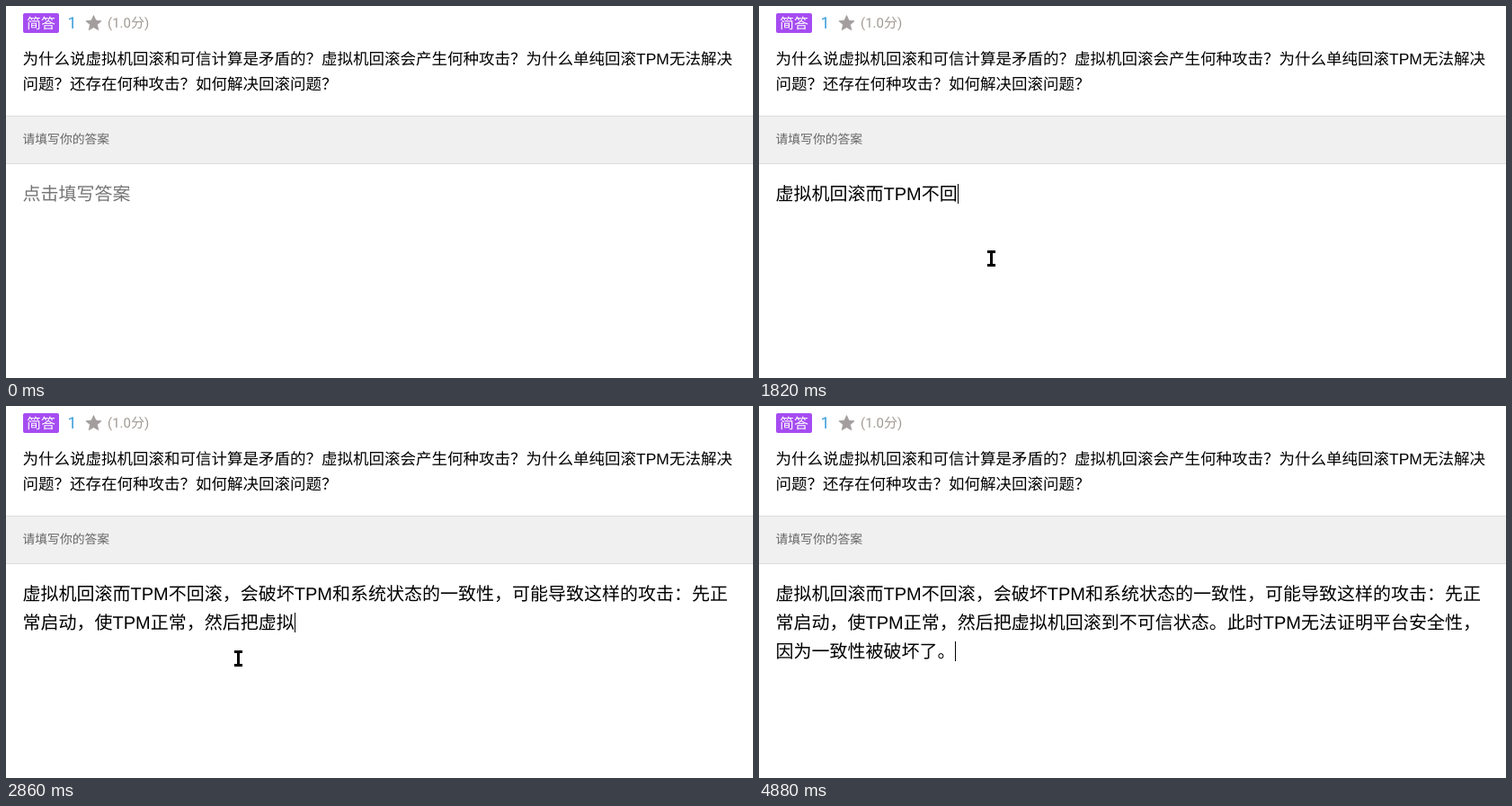
Animation, 831 px wide and 414 px high, one loop 4.95 s. Source, as an HTML page:

```html
<!DOCTYPE html>
<html lang="zh-CN">
<head>
<meta charset="utf-8">
<style>
html, body { margin: 0; width: 100%; height: 100%; overflow: hidden; background: #fff; }
svg { display: block; }
text {
  font-family: "Liberation Sans", "Noto Sans CJK SC", "Noto Sans CJK", sans-serif;
  font-weight: 350;
  text-rendering: geometricPrecision;
}
.number { font-family: Roboto, "Noto Sans CJK SC", "Noto Sans CJK", sans-serif; font-weight: 400; }
.question { font-size: 17.5px; }
.answer { font-size: 20px; }
</style>
</head>
<body>
<svg width="831" height="414" viewBox="0 0 831 414">
  <rect x="19" y="8" width="40" height="22" rx="2" fill="#a54cf2"/>
  <text x="23" y="25" font-size="16" fill="#fff">简答</text>
  <text class="number" x="68.5" y="25" font-size="18" fill="#3fa0dc">1</text>
  <path id="star" fill="#a39d9d" stroke="#a39d9d" stroke-width=".8" stroke-linejoin="round"/>
  <text class="number" x="113" y="24" font-size="15" fill="#a09a94">(1.0分)</text>

  <text class="question" x="18.5" y="65">为什么说虚拟机回滚和可信计算是矛盾的？虚拟机回滚会产生何种攻击？为什么单纯回滚TPM无法解决</text>
  <text class="question" x="18.5" y="93">问题？还存在何种攻击？如何解决回滚问题？</text>

  <rect y="122" width="831" height="54" fill="#ddd"/>
  <rect y="123" width="831" height="52" fill="#f0f0f0"/>
  <text x="18.5" y="153" font-size="13.8" fill="#666">请填写你的答案</text>

  <text id="hint" class="answer" x="18.5" y="216" fill="#757575">点击填写答案</text>
  <text class="answer typed" x="18.5" y="216"></text>
  <text class="answer typed" x="18.5" y="248"></text>
  <text class="answer typed" x="18.5" y="280"></text>
  <rect id="caret" width="1" height="22"/>

  <circle id="press" cx="258.5" cy="281.5" r="14.5" fill="#ff0" fill-opacity=".47"/>
  <path id="mouse" d="M-4.5-9.5h9v3h-3v12h3v3h-9v-3h3v-12h-3z"/>
</svg>
<script>
const LOOP = 4950;
const LINES = [
  '虚拟机回滚而TPM不回滚，会破坏TPM和系统状态的一致性，可能导致这样的攻击：先正',
  '常启动，使TPM正常，然后把虚拟机回滚到不可信状态。此时TPM无法证明平台安全性，',
  '因为一致性被破坏了。'
];
const EM = { T: 0.611, P: 0.667, M: 0.833 };
const REST = [258.5, 281.5];

const $ = id => document.getElementById(id);
const rows = [...document.querySelectorAll('.typed')];
const show = (el, on) => el.setAttribute('visibility', on ? 'visible' : 'hidden');
const within = (t, a, b) => t >= a && t < b;
const snap = (t, start, step) => start + Math.floor((t - start + 4) / step) * step;
const width = s => [...s].reduce((w, c) => w + 20 * (EM[c] || 1), 0);

$('star').setAttribute('d', 'M' + Array.from({ length: 10 }, (_, i) => {
  const r = i % 2 ? 4.2 : 9, a = i * Math.PI / 5;
  return [97.5 + r * Math.sin(a), 19.5 - r * Math.cos(a)].map(v => v.toFixed(2));
}).join('L') + 'z');

function typedCount(t) {
  if (t < 1610) return 0;
  const s = t < 2390 ? snap(t, 1610, 69) : snap(t, 2660, 67.3);
  return Math.min(92, Math.floor(0.0433 * (s - 1541)));
}

function drawAnswer(t) {
  const n = typedCount(t);
  let left = n, row = 0, x = 19;
  LINES.forEach((line, i) => {
    const part = line.slice(0, Math.max(0, left));
    rows[i].textContent = part;
    if (part) {
      row = i;
      x = Math.round(18.45 + width(part));
    }
    left -= line.length;
  });
  show($('hint'), !n);
  $('caret').setAttribute('x', x);
  $('caret').setAttribute('y', 198 + 32 * row);
  show($('caret'), within(t, 750, 1280) || within(t, 1610, 4190) || t >= 4720);
}

function drawMouse(t) {
  let far = REST, p = 0;
  if (t < 480) {
    far = [641.5, 391.5];
    p = (1 - Math.min(1, (snap(t, 200, 67.5) - 200) / 270)) ** 1.6;
  } else if (t >= 4390) {
    far = [742, 409];
    p = ((snap(t, 4390, 69) - 4321) / 483) ** 1.6;
  }
  const [x, y] = REST.map((v, i) => Math.round(v + (far[i] - v) * p - 0.5) + 0.5);
  $('mouse').setAttribute('transform', `translate(${x} ${y})`);
  show($('mouse'), within(t, 200, 4875));
  show($('press'), within(t, 750, 880));
}

const begin = performance.now();
function frame() {
  const t = (performance.now() - begin) % LOOP;
  drawAnswer(t);
  drawMouse(t);
  requestAnimationFrame(frame);
}
frame();
</script>
</body>
</html>
```
